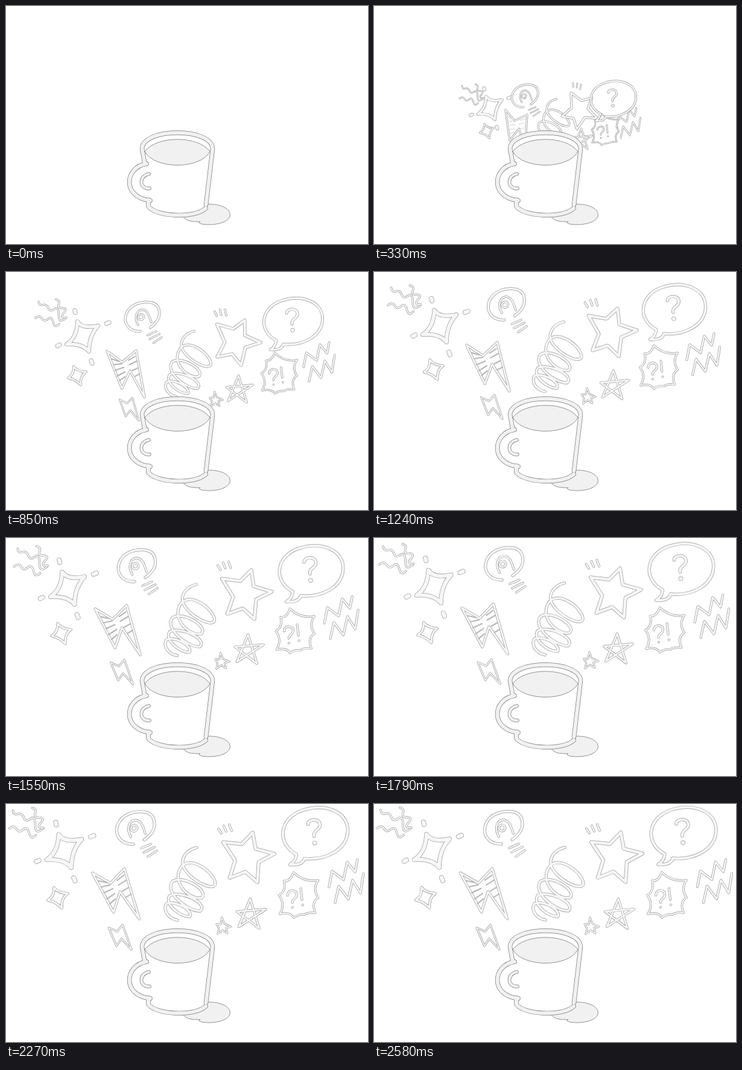
Recreate the animation shown at these times as an HTML page with a canvas. Size 600x394 px, loop 2.61 s.

```html
<!DOCTYPE html>
<html lang="en">
<head>
<meta charset="utf-8">
<title>Coffee doodles</title>
<style>
  html, body { margin: 0; width: 100%; height: 100%; overflow: hidden; background: #fff; }
  canvas { display: block; }
</style>
</head>
<body>
<canvas id="stage" width="600" height="394"></canvas>
<script>
const ctx = document.getElementById('stage').getContext('2d');
const LOOP = 2610;
const ORIGIN = { x: 285, y: 257 };
const INK = '#f6f6f6';
const CUP_INK = '#f0f1f0';

const line = (width, d) => ({ width, path: new Path2D(d) });

// Each doodle is drawn at its resting place; turn is the rotation in degrees it unwinds on the way out.
const doodles = [
  { x: 34, y: 27, turn: 0, lines: [
    line(3.6, 'M5,40 Q13,34 17,41 T28,42 T38,48 T49,51'),
    line(3.6, 'M11,10 Q12,18 19,16 T29,22 T40,24 T48,35 T61,40'),
    line(3.6, 'M43,6 Q51,8 48,15 T55,22 T57,31 T62,39')
  ] },
  { x: 97, y: 78, turn: 0, lines: [
    line(7.5, 'M87,50 Q95,64 125,58 Q108,76 108,105 Q96,90 67,92 Q86,80 87,50Z'),
    line(8, 'M82,30 l1,4 M140,54 l5,-2 M112,122 l2,5 M50,95 l4,-2')
  ] },
  { x: 86, y: 154, turn: 0, lines: [
    line(4.5, 'M79,138 Q85,147 102,148 Q91,155 92,172 Q83,162 69,159 Q80,153 79,138Z')
  ] },
  { x: 182, y: 150, turn: 40, lines: [
    line(4.5, 'M143,114 L173,131 L196,107 L221,190 L189,145 L178,179Z'),
    line(2, 'M153,127 l14,3 M158,137 l14,-3 M162,147 l15,-7 M167,157 l13,-9 M172,165 l9,-8 ' +
      'M184,126 l11,-8 M186,134 l13,-8 M193,144 l10,-6 M199,154 l8,-5')
  ] },
  { x: 190, y: 220, turn: 25, lines: [
    line(3.2, 'M170,205 L184,211 L193,200 L208,241 L191,223 L183,235Z')
  ] },
  { x: 216, y: 46, turn: 0, lines: [
    line(5, 'M211,66 C190,67 179,51 185,34 C192,16 213,10 231,13 C249,17 249,38 240,49 Q235,55 229,59'),
    line(4, 'M207,54 C200,43 202,28 214,26 C225,27 227,38 231,49 M207,40 C208,32 220,34 217,41 C214,47 207,45 207,40'),
    line(3.6, 'M224,73 L240,66 M228,80 L246,71 M235,87 L250,77')
  ] },
  { x: 306, y: 132, turn: 0, lines: [
    line(5, 'M316,72 C302,75 291,86 293,100 C298,123 347,148 347,131 C345,112 303,82 289,106 ' +
      'C274,132 307,160 325,155 C337,143 293,116 276,128 C262,145 299,177 322,177 ' +
      'C337,164 286,141 271,152 C262,166 290,188 305,186 C310,174 276,157 265,166 C260,179 272,190 284,192')
  ] },
  { x: 403, y: 88, turn: 62, lines: [
    line(6, 'M360,63 L391,66 L409,47 L414,74 L445,82 L419,96 L417,129 L397,112 L371,122 L380,93Z'),
    line(4, 'M352,41 L357,48 M361,36 L365,45 M370,34 L374,44')
  ] },
  { x: 406, y: 182, turn: 0, lines: [
    line(4.2, 'M405,157 L420,206 L383,178 L431,174 L386,203Z')
  ] },
  { x: 362, y: 202, turn: 0, lines: [
    line(3, 'M358,188 L362,198 L373,203 L365,205 L367,214 L359,209 L351,215 L353,206 L349,199 L356,199Z')
  ] },
  { x: 486, y: 152, turn: 0, lines: [
    line(3.6, 'M477,113 Q494,130 518,126 Q508,140 518,155 Q506,162 513,180 Q499,179 495,183 ' +
      'Q484,182 477,188 Q472,178 454,182 Q464,166 453,151 Q465,144 461,127 Q471,129 477,113Z'),
    line(4, 'M467,151 C467,140 484,141 482,151 C481,158 474,157 475,163 M475,171 h.2 M489,140 L491,158 M492,167 h.2')
  ] },
  { x: 566, y: 127, turn: 0, lines: [
    line(4.2, 'M536,137 L541,111 L560,125 L566,96 L579,112 L583,92'),
    line(4.2, 'M546,163 L552,136 L568,157 L575,126 L588,147 L593,115')
  ] },
  { x: 514, y: 51, turn: 0, lines: [
    line(5.4, 'M482,83 C448,65 453,23 492,10 C532,-3 568,14 567,44 C566,76 530,93 495,90 C493,98 485,101 471,100 C479,96 481,90 482,83Z'),
    line(5.4, 'M501,33 C501,24 521,22 521,35 C520,44 509,43 511,53'),
    line(7.5, 'M512,64 h.2')
  ] }
];

const cupBody = new Path2D('M222,234 A62,28 0 0 1 346,234 L333,335 C322,354 244,354 233,333Z');
const cupHandle = new Path2D('M233,261 C196,267 192,317 239,322');
const coffee = new Path2D('M230,241 C249,214 319,214 338,241 C322,271 246,271 230,241Z');
const puddle = new Path2D('M293,348 C309,348 323,343 329,335 Q329,328 337,328 ' +
  'C358,328 374,337 371,348 C367,360 342,364 325,361 Q317,359 322,357 C309,357 299,357 293,348Z');
const cupLines = new Path2D('M230,261 L225.5,236 C228,201 340,201 342.5,236 L331.5,329');
cupLines.addPath(cupHandle);
cupLines.addPath(new Path2D('M236,321 L236,332 C250,349 312,352 331,335'));
const cupLoop = new Path2D('M237,278 C220,281 220,303 238,302');

function outlined(path, width, edge, color, fill) {
  ctx.strokeStyle = color;
  ctx.lineWidth = width;
  ctx.stroke(path);
  ctx.strokeStyle = fill;
  ctx.lineWidth = width - 2 * edge;
  ctx.stroke(path);
}

function filled(path, fill, edgeColor) {
  ctx.fillStyle = fill;
  ctx.fill(path);
  if (!edgeColor) return;
  ctx.strokeStyle = edgeColor;
  ctx.lineWidth = 0.8;
  ctx.stroke(path);
}

function drawDoodle({ x, y, turn, lines }, progress) {
  const scale = 0.4 + 0.6 * progress;
  ctx.save();
  ctx.translate(ORIGIN.x + (x - ORIGIN.x) * progress, ORIGIN.y + (y - ORIGIN.y) * progress);
  ctx.rotate(turn * (1 - progress) * Math.PI / 180);
  ctx.scale(scale, scale);
  ctx.translate(-x, -y);
  for (const { width, path } of lines) outlined(path, width, 0.7 / scale, '#999', INK);
  ctx.restore();
}

function drawCup() {
  filled(cupBody, '#fff');
  filled(puddle, CUP_INK, '#777');
  outlined(cupLines, 7.4, 0.7, '#777', CUP_INK);
  outlined(cupLoop, 5.5, 0.7, '#777', CUP_INK);
  filled(coffee, CUP_INK, '#777');
}

// Fast burst that settles exponentially.
const progressAt = t => Math.min(1, Math.max(0, 1.006 * (1 - Math.exp((20 - t) / 465))));

function render() {
  const progress = progressAt(performance.now() % LOOP);
  ctx.fillStyle = '#fff';
  ctx.fillRect(0, 0, 600, 394);
  if (progress > 0) doodles.forEach(doodle => drawDoodle(doodle, progress));
  drawCup();
  requestAnimationFrame(render);
}

ctx.lineCap = ctx.lineJoin = 'round';
render();
</script>
</body>
</html>
```
